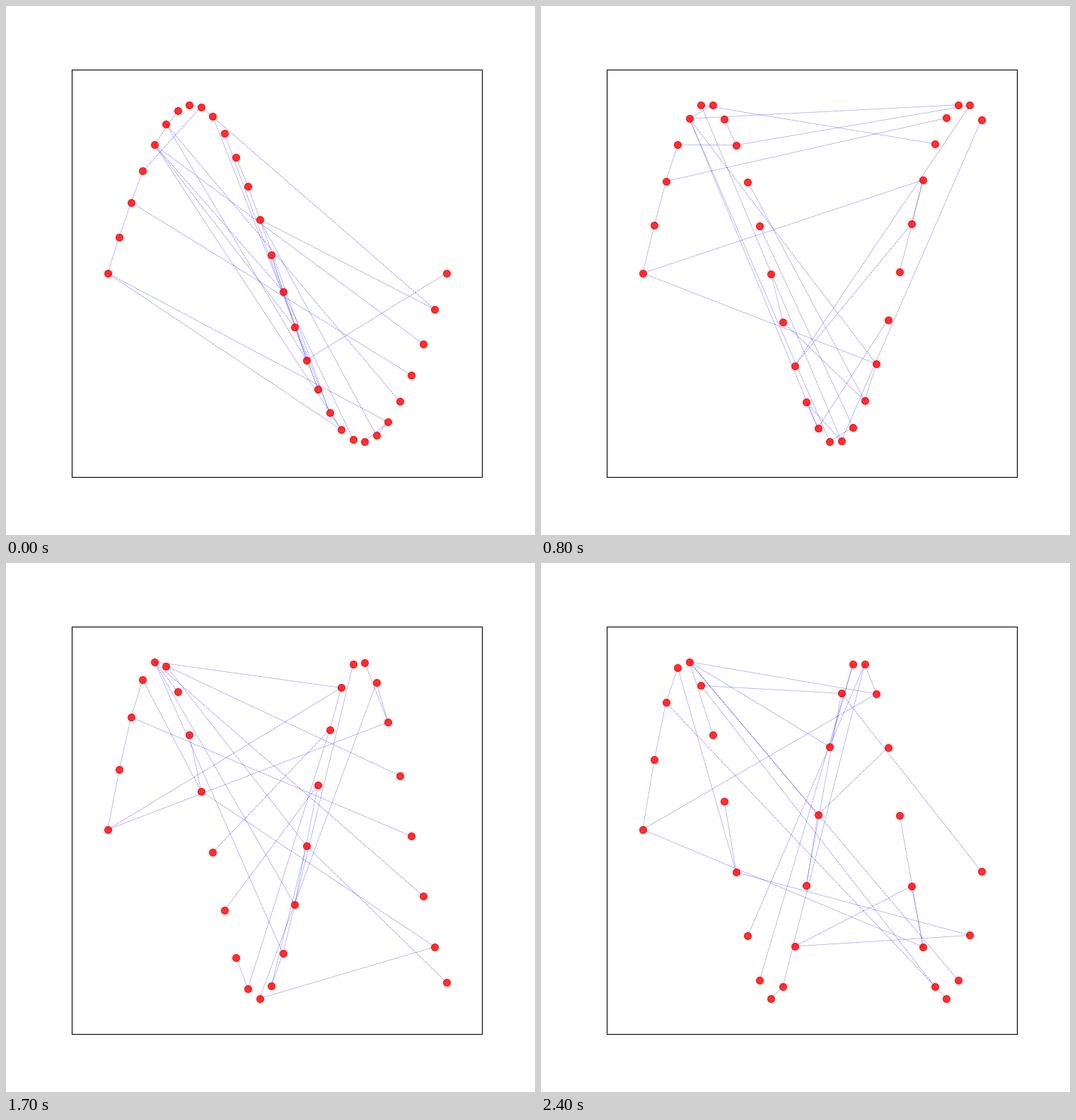
These frames come from a looping animation (748 by 748 pixels, 2.5 s). A matplotlib script:

```python
import numpy as np
import matplotlib.pyplot as plt
from matplotlib.animation import FuncAnimation
from matplotlib.collections import LineCollection

SIZE, DPI = 748, 100
FRAMES, INTERVAL = 25, 100
NODES = 30

# The graph as walks from node to node, numbered left to right.
WALKS = [
    (26, 2, 3, 8, 28, 13, 23, 24, 22),
    (2, 1, 0, 24),
    (0, 20, 19, 12, 11),
    (20, 4, 16, 18, 10),
    (25, 5, 17, 29),
    (17, 14, 15, 21),
    (6, 4, 27),
    (4, 15), (7, 8), (9, 19),
]


def walk_edges(walks):
    return np.array([sorted(step) for walk in walks
                     for step in zip(walk, walk[1:])])


def padded(values, pad=0.105):
    lo, hi = values.min(), values.max()
    margin = pad * (hi - lo)
    return lo - margin, hi + margin


def wave(frame):
    """Sine curve whose frequency grows from one to almost two periods."""
    return np.sin(x * (1 + frame / FRAMES))


x = np.linspace(0, 2 * np.pi, NODES)
edges = walk_edges(WALKS)

fig, ax = plt.subplots(figsize=(SIZE / DPI, SIZE / DPI), dpi=DPI)
fig.subplots_adjust(left=0.1249, right=0.9, bottom=0.11, top=0.88)
ax.set(xticks=[], yticks=[], xlim=padded(x))

links = LineCollection([], colors="blue", linewidths=0.5,
                       linestyles="dotted", zorder=1)
ax.add_collection(links, autolim=False)
nodes = ax.scatter(x, wave(0), s=50, c="red", alpha=0.8,
                   linewidths=1, zorder=2)


def update(frame):
    points = np.column_stack([x, wave(frame)])
    nodes.set_offsets(points)
    links.set_segments(points[edges])
    ax.set_ylim(padded(points[:, 1]))
    return nodes, links


anim = FuncAnimation(fig, update, frames=FRAMES, interval=INTERVAL,
                     repeat=True, repeat_delay=0, blit=False)
plt.show()
```
